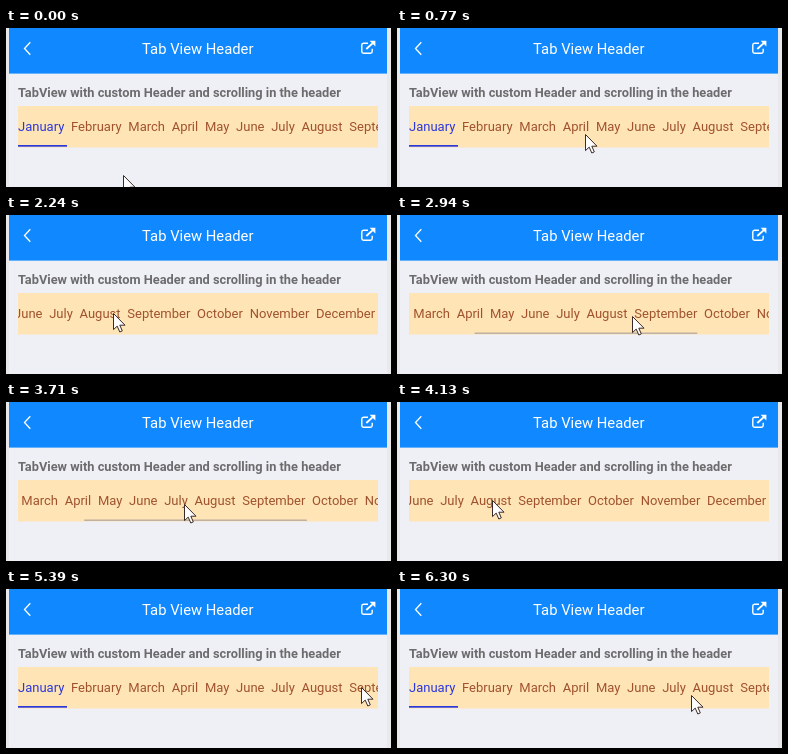
Animation, 385 px wide and 159 px high, one loop 6860 ms. Source, as an HTML page:

```html
<!DOCTYPE html>
<html lang="en">
<head>
<meta charset="utf-8">
<title>Tab View Header</title>
<style>
html, body { margin: 0; width: 100%; height: 100%; overflow: hidden; background: #e9e9eb; }
svg { display: block; width: 385px; height: 159px; font-family: Roboto, sans-serif; }
</style>
</head>
<body>
<svg viewBox="0 0 385 159">
  <defs><clipPath id="band"><rect x="12" y="78" width="360" height="42"/></clipPath></defs>
  <rect width="385" height="159" fill="#e9e9eb"/>
  <rect x="3" width="378" height="159" fill="#eff0f5"/>
  <rect x="3" width="378" height="45.6" fill="#1088ff"/>
  <g fill="none" stroke="#fff">
    <path stroke-width="1.3" d="M24.3 14.3 18.5 20.5 24.3 26.7"/>
    <path stroke-width="1.4" d="M362 15.2H357.5Q355.8 15.2 355.8 17V23.6Q355.8 25.3 357.5 25.3H364.5Q366.2 25.3 366.2 23.6V20.8"/>
    <path stroke-width="1.9" d="M360.3 21 367.3 14.6"/>
    <path fill="#fff" stroke="none" d="M363.6 12.7H369.4V18.4Z"/>
  </g>
  <text x="191.8" y="26.4" font-size="14.8" fill="#fff" text-anchor="middle">Tab View Header</text>
  <text x="12" y="69.3" font-size="12.81" font-weight="700" fill="#6c6c6e">TabView with custom Header and scrolling in the header</text>
  <rect x="12" y="78" width="360" height="41.5" fill="#ffe4b5"/>
  <g clip-path="url(#band)">
    <g id="tabs">
      <rect x="12" y="117" width="49" height="1.7" fill="#2a38dc"/>
      <text id="labels" x="12" y="103" font-size="13" fill="#a0522d"></text>
    </g>
    <rect id="bar" y="117.5" height="1.5" fill="#bdb2a2"/>
  </g>
  <path id="cursor" d="M.5 .5V16.6L4.2 13.1 6.8 19 9.3 17.9 6.8 12.2H12Z" fill="#fff" stroke="#3a2a28"/>
</svg>
<script>
const LOOP = 6860, STEP = 70, VIEW = 360, CONTENT = 582, GAP = 6.7;
const MAX = CONTENT - VIEW;
const $ = id => document.getElementById(id);
const tabs = $('tabs'), bar = $('bar'), cursor = $('cursor');

for (let m = 0; m < 12; m++) {
  const label = document.createElementNS('http://www.w3.org/2000/svg', 'tspan');
  label.textContent = new Date(2020, m, 1).toLocaleString('en-US', { month: 'long' });
  if (m) label.setAttribute('dx', GAP);
  else label.setAttribute('fill', '#2a38dc');
  $('labels').append(label);
}

// start, end, then pointer x, pointer y and scroll offset reached at the end
const moves = [
  [0, 210, 83, 105, 0],
  [210, 630, 217, 104, 0],
  [700, 770, 188, 106, 0],
  [770, 1190, 56, 118, 139],
  [1260, 1540, 240, 98, 139],
  [1680, 2100, 107, 98, MAX],
  [2590, 3220, 303, 102, 44],
  [3500, 3710, 178, 102, 107],
  [3710, 4130, 95, 98, MAX],
  [4480, 4760, 297, 98, 114],
  [4760, 5110, 366, 97, 0],
  [5320, 5950, 294, 106, 0]
];

const ease = p => p * (1.4 - 0.4 * p);

function stateAt(t) {
  let now = [117, 147, 0];
  for (const [start, end, ...to] of moves) {
    if (t < start) break;
    const p = ease(Math.min(1, (t - start) / (end - start)));
    now = now.map((v, i) => v + (to[i] - v) * p);
  }
  return now.map(Math.round);
}

function draw(ms) {
  const t = Math.floor((ms % LOOP) / STEP) * STEP;
  const [x, y, offset] = stateAt(t);
  // The bar shows only in mid-scroll.
  const scrolling = [t - STEP, t + STEP].every(near => stateAt(near)[2] !== offset);
  cursor.setAttribute('transform', `translate(${x} ${y})`);
  tabs.setAttribute('transform', `translate(${-offset} 0)`);
  bar.setAttribute('x', 12 + offset * VIEW / CONTENT);
  bar.setAttribute('width', VIEW * VIEW / CONTENT);
  bar.setAttribute('opacity', scrolling ? 1 : 0);
}

const begin = performance.now();
function frame() {
  draw(performance.now() - begin);
  requestAnimationFrame(frame);
}
frame();
</script>
</body>
</html>
```
